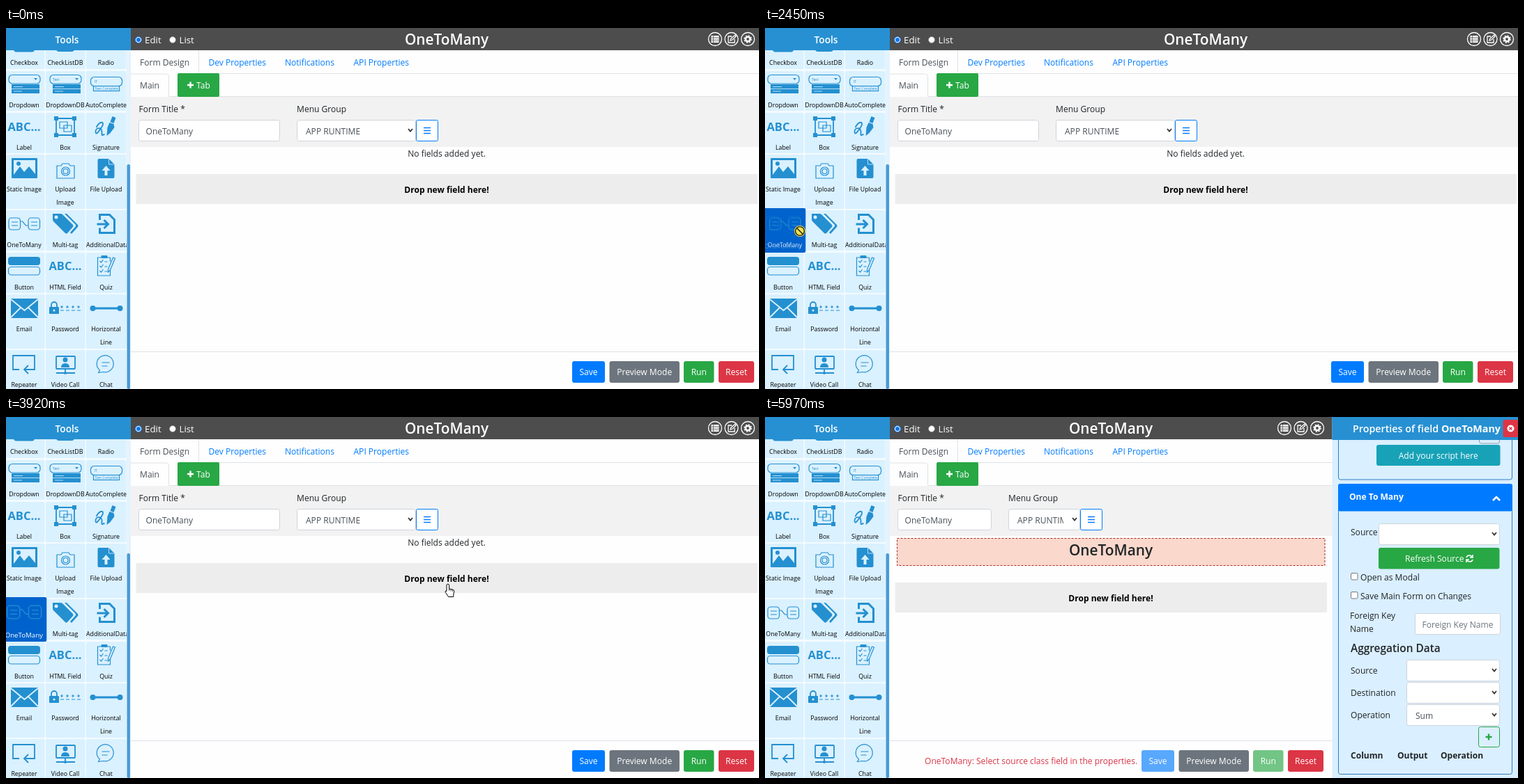
An HTML page that plays this animation: 1080 px wide and 519 px high, repeating every 6100 ms.

```html
<!DOCTYPE html>
<html lang="en">
<head>
<meta charset="utf-8">
<title>Form designer</title>
<style>
  html, body { margin: 0; height: 100%; overflow: hidden; background: #fefefe; }
  svg { display: block; }
  #stage { width: 100vw; height: 100vh; }
  text { font: 12.05px "Open Sans", "Noto Sans", sans-serif; fill: #212529; white-space: pre; }
  .mid { text-anchor: middle; }
  .white { fill: #fff; }
  .link { fill: #007bff; }
  .soft { fill: #495057; }
  .hint { fill: #6c757d; }
  .error { fill: #dc3545; }
  .bold { font-weight: 700; }
  .black { fill: #000; }
  .head { font-weight: 600; font-size: 13.7px; }
  .title { font-weight: 600; font-size: 20.8px; }
  .panel { font-weight: 600; font-size: 14.3px; }
  .sub { font-weight: 600; font-size: 15.4px; }
  .radio { font-size: 13.3px; }
  .label { font-size: 8.8px; text-anchor: middle; fill: #000; }
  .label.white { fill: #fff; }
  .abc { font-weight: 700; font-size: 16.5px; fill: #2490d0; text-anchor: middle; }
  .tiny { font-size: 5px; fill: #2490d0; }
  .icon { fill: #2490d0; stroke: none; }
  .icon .line { fill: none; stroke: #2490d0; stroke-width: 1.8; }
  .icon .thin { fill: none; stroke: #2490d0; stroke-width: 1.2; }
  .icon .heavy { fill: none; stroke: #2490d0; stroke-width: 3; }
  .icon .cut { fill: none; stroke: #daf1ff; stroke-width: 1.8; }
  .icon .hair { fill: none; stroke: #daf1ff; stroke-width: .8; }
  .icon .pale { fill: #daf1ff; }
</style>
</head>
<body>
<svg id="stage" viewBox="0 0 1080 519" preserveAspectRatio="none"></svg>
<script>
const text = (x, y, s, cls = '') => `<text x="${x}" y="${y}" class="${cls}">${s}</text>`;
const rect = (x, y, w, h, fill, extra = '') =>
  `<rect x="${x}" y="${y}" width="${w}" height="${h}" fill="${fill}" ${extra}/>`;
const path = (d, cls = '') => `<path d="${d}" class="${cls}"/>`;
const stroke = (d, color, w = 1) => `<path d="${d}" fill="none" stroke="${color}" stroke-width="${w}"/>`;
const circle = (x, y, r, cls = '') => `<circle cx="${x}" cy="${y}" r="${r}" class="${cls}"/>`;
const group = (x, y, s) => `<g transform="translate(${x} ${y})">${s}</g>`;
const button = (x, y, w, h, fill, label, extra = '') =>
  `<g ${extra}>${rect(x, y, w, h, fill, 'rx="3"')}${text(x + w / 2, y + h / 2 + 4.5, label, 'white mid')}</g>`;
const field = (x, y, w, h, label = '', cls = 'soft', room = 10) =>
  rect(x + .5, y + .5, w - 1, h - 1, '#fff', 'rx="3" stroke="#ced4da"') +
  `<svg x="${x}" y="${y}" width="${w - room}" height="${h}">${text(room > 20 ? 13 : 10.5, 20.5, label, cls)}</svg>`;
const select = (x, y, w, h, label) =>
  field(x, y, w, h, label, 'soft', 24) + stroke(`M${x + w - 11} ${y + 13}l3 3.5 3-3.5`, '#333', 1.8);

// ---- toolbox: icons are drawn around x = 0, at stage heights ----
const abc = y => text(0, y, 'ABC...', 'abc');
const box = (x, y, w, h, r, cls = '') => `<rect x="${x}" y="${y}" width="${w}" height="${h}" rx="${r}" class="${cls}"/>`;
const dropdown = s => box(-22, 67.5, 45, 12.5, 5, 'thin') + path('M14 72h5l-2.5 3z') +
  text(-18, 76, s, 'tiny') + box(-18, 81, 40, 13, 0) + path('M-15 84.5h13M-15 91h12M-18 87.5h40', 'hair');
const link = box(-22, 273, 16.5, 17, 4, 'thin') + box(6, 273, 16.5, 17, 4, 'thin') +
  path('M-18 279h9M-18 284h9M10 279h9M10 284h9M-5.5 278h3l5 6h3.5', 'thin');

const tools = [
  [0, 0, 'Checkbox', box(-15, 20, 30, 14.5, 4)],
  [1, 0, 'CheckListDB', box(-13, 20, 26, 14, 4)],
  [2, 0, 'Radio', ''],
  [0, 1, 'Dropdown', dropdown('')],
  [1, 1, 'DropdownDB', dropdown('Text')],
  [2, 1, 'AutoComplete', box(-22, 70.5, 45, 13, 5, 'thin') + text(-17, 79, 'IT', 'tiny') +
    box(-18, 83.5, 37, 7, 0, 'thin') + text(-16, 89, 'Text Complete', 'tiny')],
  [0, 2, 'Label', abc(147.5)],
  [1, 2, 'Box', path('M-13 130h26v24h-26z', 'line') + path('M-8 135h11v9h-11zM-2 140h11v9h-11z', 'thin') +
    path('M-16 127h6v6h-6zM10 127h6v6h-6zM-16 151h6v6h-6zM10 151h6v6h-6z')],
  [2, 2, 'Signature', path('M9 127l5 2-3 8-5-2zM5 136l6 2 1 5-6 8-5 4 1-12z') +
    path('M-14 143c5-10 13-9 8-1s-9 13-9 7 9-7 9 0-1 5 4 4', 'line')],
  [0, 3, 'Static Image', box(-18, 187, 37, 29, 1) + path('M-15 190h31v20l-9-11-7 8-6-8-9 12z', 'pale') + circle(-8, 195, 3)],
  [1, 3, 'Upload', path('M-12 198h6l2-3h9l2 3h6v18h-25z', 'thin') + circle(.5, 206, 6, 'thin') + circle(.5, 206, 3.5, 'thin'), 'Image'],
  [2, 3, 'File Upload', path('M-12 190q0-2 2-2h14l8 8v18q0 2-2 2h-20q-2 0-2-2z') +
    path('M4 188v8h8', 'hair') + path('M0 198l6 7h-4v7h-4v-7h-4z', 'pale')],
  [2, 4, 'AdditionalData', path('M-9 276v-7.500h14l7 7v19h-21v-7', 'heavy') +
    path('M-13 282h15M-3 276l6 6-6 6', 'heavy')],
  [0, 5, 'Button', box(-23, 329, 46, 12, 4) + box(-22.5, 343.5, 45, 11.5, 4, 'thin')],
  [1, 5, 'HTML Field', abc(348)],
  [2, 5, 'Quiz', path('M6 330h-18v26h18v-9M6 330v6', 'thin') + box(-7, 327, 9, 4, 1) +
    path('M-9 335l2 2 3-4M-9 342l2 2 3-4M-9 349l2 2 3-4M-2 336h4M-2 343h4M-2 350h4M10 330l3 1-7 17-3 3v-4z', 'thin')],
  [0, 6, 'Email', box(-19, 389, 39, 28, 1) + path('M-19 390l19.5 16 19.5-16M-19 416l14-14M20 416l-14-14', 'cut')],
  [1, 6, 'Password', box(-23, 401, 14, 10, 1) + path('M-20 402v-4a4 4 0 0 1 8 0v4', 'line') + circle(-16, 406, 1.5, 'pale') +
    [-5, 3, 11, 19].map(x => path(`M${x - 2} 401h4M${x} 399v4M${x - 2} 406h5`, 'thin')).join('')],
  [2, 6, 'Horizontal', path('M-20 401.5h40v3h-40z') + circle(-19, 403, 4) + circle(20, 403, 4), 'Line'],
  [0, 7, 'Repeater', path('M-7 491h-9v-20h31v20h-14M6 485l-6 6 6 6', 'line')],
  [1, 7, 'Video Call', box(-13, 472, 27, 18, 1, 'line') + circle(0, 477, 3.5) + path('M-6 488q0-6 6-6t6 6z') +
    path('M0 490v4M-13 496h27', 'line') + circle(0, 496, 2)],
  [2, 7, 'Chat', path('M-9 492a12 12 0 1 1 5 2.5l-7 1z', 'thin') + path('M-6 481h11M-6 486h8', 'thin')],
  [1, 4, 'Multi-tag', path('M-18 267h11q2 0 3 1l15 15q1 1.5 0 3l-8 9q-2 1-3 0l-17-17q-1-1-1-3z') +
    path('M-1 267h3l16 16q1 1.5 0 3l-9 10-2-2 8-9v-2z') + circle(-13, 272, 2.5, 'pale')],
  [0, 4, 'OneToMany', link]
];
const centers = [26, 85, 143.5], lefts = [0, 57, 115], widths = [55.5, 56.5, 57.5];
const tops = [31, 62, 122, 182, 262, 323, 383, 463], bottoms = [59, 119, 180, 260, 320, 381, 461, 521];
const baselines = [53, 114, 174.5, 235, 315, 376, 436, 516];

function tile([col, row, name, icon, more]) {
  const y = baselines[row], wide = name === 'AdditionalData';
  return `<g data-name="${name}">` +
    rect(lefts[col], tops[row], widths[col], bottoms[row] - tops[row], '#daf1ff', 'rx="2"') +
    `<g class="icon">${group(centers[col], 0, icon)}</g>` +
    `<text x="${wide ? 115 : centers[col]}" y="${y}" class="label" ${wide ? 'style="text-anchor:start"' : ''}>${name}</text>` +
    (more ? text(centers[col], y + 19, more, 'label') : '') + '</g>';
}

const sidebar = rect(0, 0, 179, 519, '#f3fbff') +
  `<svg width="173" height="519">${tools.map(tile).join('')}</svg>` +
  rect(173, 32, 6, 487, '#e4f3fd') + rect(173.5, 196, 4.5, 323, '#4a9bd6', 'rx="2"') +
  rect(0, 0, 179, 32, '#2790d2') + text(87.5, 22, 'Tools', 'head white mid');

// ---- main area: mode 0 empty form, 1 field being named, 2 field placed ----
const plus = (x, y, color, r = 4.5) => stroke(`M${x - r} ${y}h${2 * r}M${x} ${y - r}v${2 * r}`, color, 2.4);
const ring = (x, y, r, w, extra = '') =>
  `<circle cx="${x}" cy="${y}" r="${r}" fill="none" stroke="#fff" stroke-width="${w}" ${extra}/>`;

const headerIcons = [1017, 1040.5, 1064].map(x => ring(x, 16, 9.5, 1.3)).join('') +
  rect(1011.5, 11, 11, 10, '#fff') + stroke('M1012 13.5h10M1012 16h10M1012 18.5h10M1014.5 11v10', '#4d4d4d', .7) +
  stroke('M1041 12h-5v9h9v-5M1039 18l1-3 6-5 1 2-5 5z', '#fff', 1.3) +
  ring(1064, 16, 3.3, 2.6) + ring(1064, 16, 5, 1.6, 'stroke-dasharray="2 1.93"');

function fieldArea(mode) {
  if (!mode) return text(632, 185, 'No fields added yet.', 'mid');
  const frame = h => rect(189.5, 174.5, 613.5, h, '#fad8cb', 'stroke="#a52a2a" stroke-dasharray="3 2"');
  if (mode === 2) return frame(39) + text(496, 199, 'OneToMany', 'title mid');
  return frame(53) + rect(190.5, 171, 612.5, 50, '#fff', 'stroke="#6aa5f5" stroke-dasharray="3 2"') +
    stroke('M191 220.5h612', '#9aa6d8', 1.5) +
    text(201, 191, 'OneToMany', 'bold') + stroke('M201 193.5' + 'q1 -2 2 0t2 0'.repeat(18), '#e33', .9) +
    stroke('M273.5 178v16', '#000') + stroke('M794 218l7-7M798 218l3-3', '#777', .9);
}

function main(mode) {
  const open = mode > 0, shift = open ? -272 : 0, menu = open ? 349 : 417, menuWidth = open ? 103 : 171;
  const zoneY = [210, 246, 238][mode], faded = open ? 'opacity=".65"' : '';
  const barsX = menu + menuWidth;
  return rect(179, 0, 901, 519, '#fefefe') + rect(179, 0, 901, 32, '#4d4d4d') +
    '<circle cx="190" cy="17" r="4.5" fill="#fff" stroke="#0b74e8"/><circle cx="190" cy="17" r="3" fill="#0b74e8"/>' +
    '<circle cx="239" cy="17" r="4.5" fill="#fff" stroke="#888" stroke-width=".8"/>' +
    text(199, 22, 'Edit', 'radio white') + text(248.5, 22, 'List', 'radio white') +
    text(632 + shift / 2, 24, 'OneToMany', 'title mid white') + group(shift, 0, headerIcons) +
    stroke('M276.5 32v33.5H1080M233.5 98.5V70q0-4-4-4H179M233.5 98.5H1080', '#dee2e6') +
    text(192, 53.5, 'Form Design', 'soft') + text(290.5, 53.5, 'Dev Properties', 'link') +
    text(400, 53.5, 'Notifications', 'link') + text(498.5, 53.5, 'API Properties', 'link') +
    text(192, 87, 'Main', 'soft') + rect(246, 65, 60, 34, '#28a745', 'rx="2"') +
    plus(264.5, 82, '#fff') + text(273, 87, 'Tab', 'white') +
    rect(179, 99, 901, 72, '#f2f2f2') +
    text(190.5, 121, 'Form Title *') + text(menu, 121, 'Menu Group') +
    field(190, 132, open ? 135 : 203, 31, 'OneToMany') + select(menu, 132, menuWidth, 31, 'APP RUNTIME') +
    rect(barsX + .5, 132.5, 31, 30, '#fff', 'rx="2" stroke="#007bff"') +
    stroke([143.5, 147.5, 151.5].map(y => `M${barsX + 11} ${y}h10`).join(''), '#007bff', 1.7) +
    fieldArea(mode) +
    rect(186.5, zoneY, 891.5 + shift, 43, '#ededed') +
    text(632 + shift / 2, zoneY + 26.5, 'Drop new field here!', 'bold black mid') +
    stroke('M179 465.5H1080', '#dee2e6') +
    (open ? text(229, 499, 'OneToMany: Select source class field in the properties.', 'error') : '') +
    group(shift, 0,
      button(812, 479, 47, 31, '#007bff', 'Save', faded) + button(865.5, 479, 100.5, 31, '#6c757d', 'Preview Mode') +
      button(972, 479, 43.5, 31, '#28a745', 'Run', faded) + button(1022, 479, 51, 31, '#dc3545', 'Reset'));
}

const panel = rect(813.5, 0, 267, 519, '#daefff') +
  rect(1024.5, 20, 29, 18, 'none', 'rx="3" stroke="#8a9aa5"') +
  stroke('M822.5 30V87q0 3 3 3h243q3 0 3-3V30', '#2e7cc4') +
  button(877, 40, 177.5, 30, '#17a2b8', 'Add your script here') +
  rect(813.5, 0, 267, 33, '#2790d2') +
  '<text x="843" y="22" class="panel white">Properties of field <tspan font-weight="700">OneToMany</tspan></text>' +
  rect(1058.5, 4, 22, 25, '#dc3545', 'rx="3"') + circle(1069.5, 16.5, 5, 'white') +
  stroke('M1067.5 14.5l4 4m0-4l-4 4', '#dc3545', 1.5) +
  rect(822.5, 96.5, 249, 417, '#daefff', 'rx="3" stroke="#2e7cc4"') + rect(822, 96, 250, 39.5, '#007bff', 'rx="3"') +
  text(838, 119, 'One To Many', 'bold white') + stroke('M1044 120l5-5 5 5', '#fff', 2.6) +
  text(840, 170, 'Source') + select(880, 153, 174, 31, '') +
  button(880, 188, 173.5, 30.5, '#28a745', '') + text(918, 208, 'Refresh Source', 'white') +
  stroke('M1006 202a4.5 4.5 0 0 1 8-1m1-3v4h-4M1015 205a4.5 4.5 0 0 1-8 1m-1 3v-4h4', '#fff', 1.6) +
  [224.5, 251.5].map(y => rect(840.5, y, 9.5, 9.5, '#fff', 'rx="1.5" stroke="#767676"')).join('') +
  text(854, 234.5, 'Open as Modal') + text(854, 261.5, 'Save Main Form on Changes') +
  text(839, 290, 'Foreign Key') + text(839, 308.5, 'Name') + field(932, 282, 123, 31, 'Foreign Key Name', 'hint') +
  text(840, 338, 'Aggregation Data', 'sub') +
  ['Source', 'Destination', 'Operation'].map((name, i) =>
    text(840, 369 + 32 * i, name) + select(920, 349 + 32 * i, 134, 31, i === 2 ? 'Sum' : '')).join('') +
  rect(1023.5, 445.5, 30, 29, 'none', 'rx="3" stroke="#28a745"') + plus(1038, 460, '#28a745') +
  text(840, 491, 'Column', 'bold') + text(907, 491, 'Output', 'bold') + text(969, 491, 'Operation', 'bold');

const ghostTile = rect(0, 0, 57.5, 59, '#0062cc', 'rx="3"') +
  `<g class="icon">${group(28.5, -262, link)}</g>` + text(28.5, 53, 'OneToMany', 'label white');
const pointers = {
  arrow: '<path d="M0 0v13.5l3-2.8 2 4.8 2.2-1-2-4.5h4.3z" fill="#fff" stroke="#000" stroke-width=".9"/>',
  hand: '<path d="M-2 2a1.8 1.8 0 0 1 3.600 0v5l5 1q2.4.6 2.2 3l-1 4v3.5h-7.3l-4.500-7q.4-2.5 2-1z" fill="#fff" stroke="#000"/>' +
    stroke('M1.6 7v3M4 7.5v3M6.3 8v3', '#000', .7),
  blocked: '<circle r="8" fill="#eee24a"/><circle r="6.4" fill="none" stroke="#222" stroke-width="1.4"/>' +
    stroke('M-4.5-4.5l9 9', '#222', 1.5)
};

const stage = document.getElementById('stage');
stage.innerHTML = [0, 1, 2].map(m => `<g id="mode${m}">${main(m)}</g>`).join('') + sidebar +
  `<g id="panel">${panel}</g><g id="ghost" opacity=".74">${ghostTile}</g><g id="pointer">` +
  Object.entries(pointers).map(([k, s]) => `<g id="${k}">${s}</g>`).join('') + '</g>';

// ---- motion: the pointer is sampled every STEP ms ----
const LOOP = 6100, STEP = 70, START = 320, DROP = 3915, OPEN = 4115, LEAVE = 5110, COMMIT = 5965, FADE = 300;
const pointerPath = [[320, 1004, 510], [600, 640, 456], [920, 366, 426], [1530, 214, 402], [2020, 59, 306], [2230, 50, 292],
  [2450, 50, 292], [2580, 66, 306], [2780, 168.5, 366.5], [2915, 316, 383], [3060, 500, 372], [3130, 550, 345],
  [3300, 612, 290], [3650, 634, 240], [3930, 634, 240], [4200, 651, 290], [4530, 710, 399], [5060, 966, 510]];
const ghostPath = [[2450, 0, 262], [2580, 10, 276], [2780, 107, 326], [2915, 258, 354], [3060, 419, 346], [3130, 495, 322],
  [3300, 555, 260], [3650, 585, 208]];
const hovers = { Quiz: [1735, 1885], 'HTML Field': [1885, 1980], 'Multi-tag': [1980, 2060], OneToMany: [2060, 3940] };

const clamp = v => Math.max(0, Math.min(1, v));
function along(keys, t) {
  if (t >= keys.at(-1)[0]) return keys.at(-1).slice(1);
  const i = Math.max(1, keys.findIndex(k => k[0] >= t));
  const [a, b] = [keys[i - 1], keys[i]], p = clamp((t - a[0]) / (b[0] - a[0]));
  return [1, 2].map(n => a[n] + (b[n] - a[n]) * p);
}
const $ = id => document.getElementById(id);
const show = (id, on) => { $(id).style.display = on ? '' : 'none'; };
const place = (id, [x, y]) => $(id).setAttribute('transform', `translate(${x} ${y})`);

function hover(name, t) {
  const [on, off] = hovers[name], el = stage.querySelector(`[data-name="${name}"]`);
  const level = clamp(clamp((Math.min(t, off) - on) / FADE) - Math.max(0, t - off) / FADE);
  const { x, y, width, height } = el.firstChild.getBBox(), cx = x + width / 2, cy = y + height / 2;
  const scale = t >= on && t < off ? 1.1 : 1;
  el.setAttribute('transform', `translate(${cx} ${cy}) scale(${scale}) translate(${-cx} ${-cy})`);
  el.firstChild.style.fill = `color-mix(in srgb, #0062cc ${level * 100}%, #daf1ff)`;
  el.lastChild.style.fill = `color-mix(in srgb, #fff ${level * 100}%, #000)`;
}

function frame(now) {
  const t = now % LOOP;
  const q = START + 10 + Math.floor((t - START - 5) / STEP) * STEP;
  const mode = t < OPEN ? 0 : t < COMMIT ? 1 : 2;
  [0, 1, 2].forEach(m => show('mode' + m, m === mode));
  show('panel', mode > 0);

  const dragging = t >= 2450 && t < DROP, pos = along(pointerPath, q), [x, y] = pos;
  const kind = dragging && y > 253 ? 'blocked'
    : !dragging && (x < 173 || t >= DROP && t < OPEN) ? 'hand' : 'arrow';
  Object.keys(pointers).forEach(k => show(k, k === kind));
  show('pointer', t >= START && t < LEAVE);
  place('pointer', pos);
  show('ghost', dragging);
  place('ghost', along(ghostPath, q));
  Object.keys(hovers).forEach(name => hover(name, q));
  requestAnimationFrame(frame);
}
requestAnimationFrame(frame);
</script>
</body>
</html>
```
